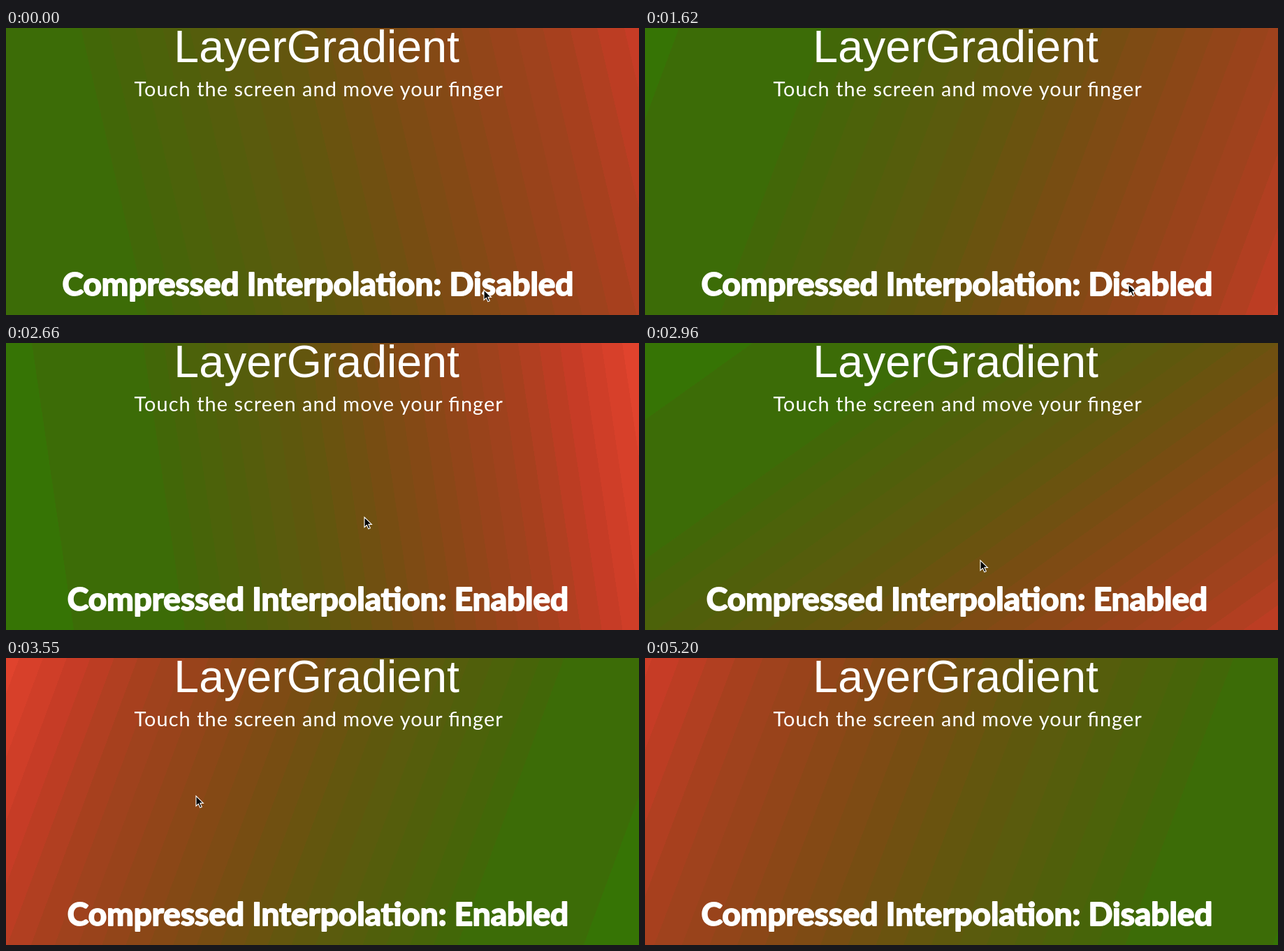
An HTML page with a canvas for the animation above (6.32 s loop, 906 by 412 pixels).

```html
<!DOCTYPE html>
<html lang="en">
<head>
<meta charset="utf-8">
<title>LayerGradient</title>
<style>
  html, body { margin: 0; width: 100%; height: 100%; overflow: hidden; background: #3a6c06; }
  canvas { position: absolute; left: 0; top: 0; }
  svg { position: absolute; left: 0; top: 0; fill: #fff; }
  .title { font: 64.5px "Liberation Sans", Arial, sans-serif; }
  .hint { font: 29px Lato, sans-serif; letter-spacing: 1px; }
  .mode {
    font: bold 46px Lato, sans-serif; text-anchor: middle;
    stroke: #fff; stroke-width: 2; stroke-linejoin: round;
  }
</style>
</head>
<body>
<canvas width="906" height="412"></canvas>
<svg width="906" height="412">
  <text class="title" x="240.3" y="49">LayerGradient</text>
  <text class="hint" x="183.5" y="98">Touch the screen and move your ﬁnger</text>
  <text class="mode" x="446.5" y="384"></text>
  <path id="cursor" d="M0 0V14.5L3.4 11.4 5.8 16.8 8.3 15.7 5.9 10.4H10.4Z"
        fill="#000" stroke="#fff" stroke-width="1.1"/>
</svg>
<script>
const ctx = document.querySelector('canvas').getContext('2d');
const mode = document.querySelector('.mode');
const cursor = document.getElementById('cursor');

const LOOP = 6320, LAST_STEP = 35;
const SHORT_STEPS = [2, 4, 6, 15, 23];
// The layer is taller than the visible stage.
const HALF_W = 453, HALF_H = 302, CX = 453, CY = 262;

// time, cursor x, cursor y, direction of the red end
const KEYS = [
  [0, 684, 376, -.153],
  [440, 700, 224, -.153],
  [1170, 720, 328, .243],
  [1620, 692, 368, .243],
  [1770, 692, 368, .243],
  [2220, 680, 255, .243],
  [2360, 645, 254, -.02],
  [2660, 513, 250, -.097],
  [2960, 480, 312, .75],
  [3260, 420, 320, 1.336],
  [3550, 272, 198, 3.384],
  [3850, 270, 208, 3.388],
  [4450, 436, 372, 3.388],
  [4900, 440, 374, 3.388],
  [5050, 711, 396, 3.388],
  [LOOP, 711, 396, 3.388]
];

// position, r, g, b
const RAMP = [
  [0, 52, 120, 4], [.12, 56, 112, 5], [.28, 64, 104, 8], [.5, 98, 86, 14],
  [.6, 120, 76, 18], [.8, 165, 64, 30], [.9, 200, 60, 38], [1, 228, 68, 46]
];

function sample(keys, t) {
  const i = Math.max(1, keys.findIndex(k => k[0] >= t));
  const a = keys[i - 1], b = keys[i];
  const f = (t - a[0]) / (b[0] - a[0]);
  return a.slice(1).map((v, j) => v + (b[j + 1] - v) * f);
}

// Colour bands: two broad greens, then even narrow ones.
const edges = [0, .12, .28];
for (let i = 1; i <= 24; i++) edges.push(.28 + i * .03);
const bands = edges.slice(1).map((end, i) => ({
  start: edges[i], end: Math.min(1, end),
  color: `rgb(${sample(RAMP, (edges[i] + Math.min(1, end)) / 2).map(Math.round)})`
}));

const stepStart = i => 150 * i - 10 * SHORT_STEPS.filter(s => s < i).length;

function snap(t) {
  let i = LAST_STEP;
  while (stepStart(i) > t) i--;
  return stepStart(i);
}

function drawGradient(angle, compressed) {
  let ux = Math.cos(angle), uy = Math.sin(angle);
  const k = compressed ? Math.SQRT2 / (Math.abs(ux) + Math.abs(uy)) : 1;
  const gx = ux * k / HALF_W / Math.sqrt(8);
  const gy = uy * k / HALF_H / Math.sqrt(8);
  const n = 2 * (gx * gx + gy * gy);
  const dx = gx / n, dy = gy / n;
  const fill = ctx.createLinearGradient(CX - dx, CY - dy, CX + dx, CY + dy);
  for (const b of bands) {
    fill.addColorStop(b.start, b.color);
    fill.addColorStop(b.end, b.color);
  }
  ctx.fillStyle = fill;
  ctx.fillRect(0, 0, 906, 412);
}

function draw(now) {
  const t = snap(now % LOOP);
  const [x, y, angle] = sample(KEYS, t);
  const compressed = t >= 1770 && t < 4600;
  drawGradient(angle, compressed);
  mode.textContent = 'Compressed Interpolation: ' + (compressed ? 'Enabled' : 'Disabled');
  cursor.setAttribute('transform', `translate(${x} ${y})`);
  cursor.style.display = t < 5200 ? '' : 'none';
  requestAnimationFrame(draw);
}
draw(0);
</script>
</body>
</html>
```
